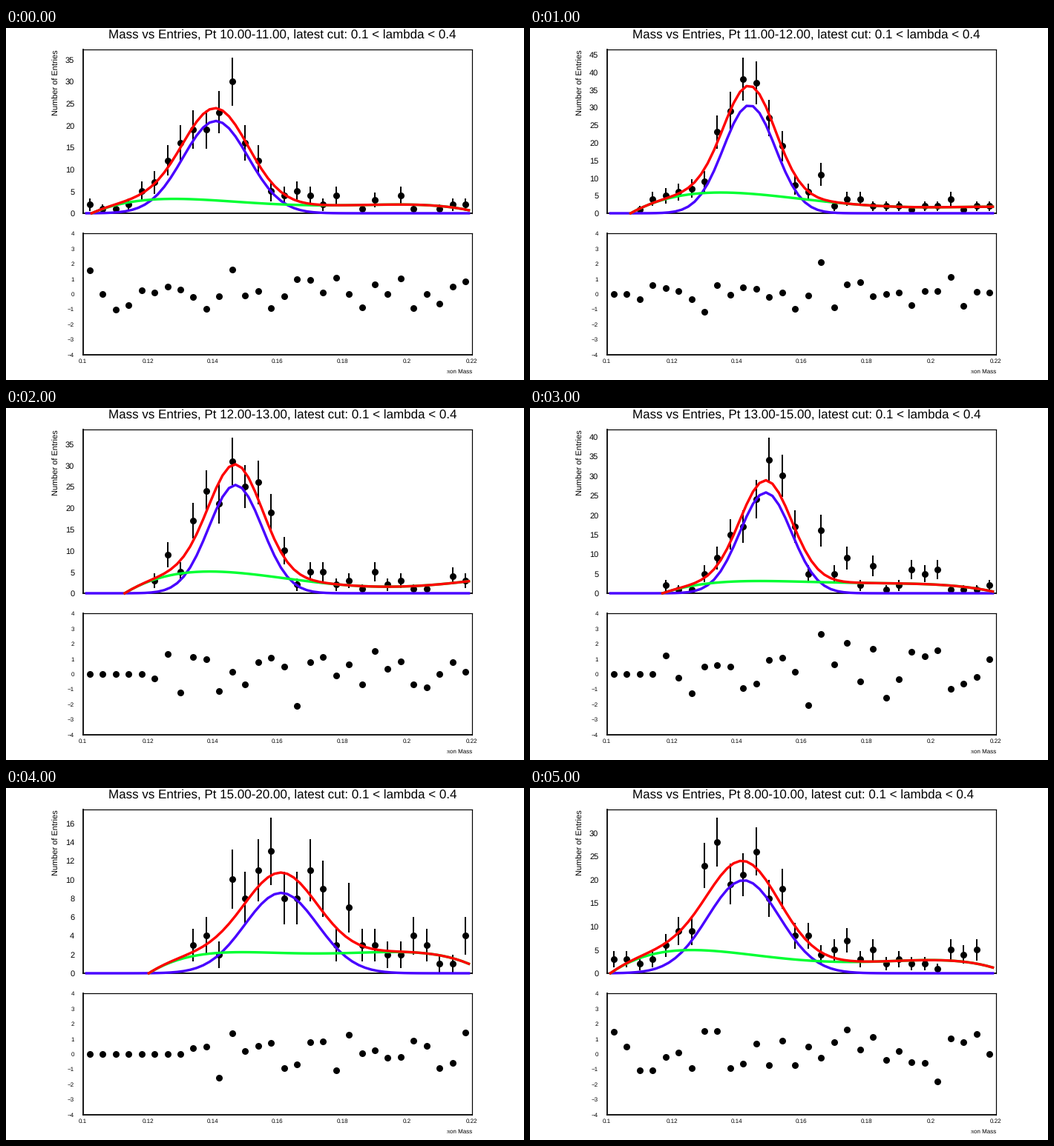
A matplotlib script for the animation above (6000 ms loop, 698 by 475 pixels).

```python
import numpy as np
import matplotlib.pyplot as plt
from matplotlib.animation import FuncAnimation

W, H, DPI = 698, 475, 100
PX = 72 / DPI  # points per pixel
LEFT, RIGHT = 104, 628

plt.rcParams["font.family"] = "Liberation Sans"
plt.rcParams["text.hinting"] = "none"
plt.rcParams["text.hinting_factor"] = 1

BINS = 0.102 + 0.004 * np.arange(30)
XS = 0.101 + 0.002 * np.arange(60)

fits = []


def gauss(x, height, mean, sigma):
    return height * np.exp(-0.5 * ((x - mean) / sigma) ** 2)


def add_fit(pt, peak, start, knots, counts):
    """Store one Pt range: Gaussian peak, quartic background, bin counts.

    The background is zero at `start`; `knots` are its values every 0.012
    up to 0.218.
    """
    kx = 0.218 - 0.012 * np.arange(len(knots))[::-1]
    weights = np.ones(len(knots) + 1)
    weights[[0, -1]] = 2
    mid = 0.16
    poly = np.polyfit(np.r_[start, kx] - mid, np.r_[0, knots], 4, w=weights)

    def back(x):
        return np.polyval(poly, x - mid)

    n = np.array(counts, float)
    err = np.sqrt(n)
    model = gauss(BINS, *peak) + back(BINS)
    pull = np.where(n > 0, (n - model) / np.maximum(err, 1), 0)
    bell = gauss(XS, *peak)
    fits.append(dict(
        title=f"Mass vs Entries, Pt {pt}, latest cut: 0.1 < lambda < 0.4",
        n=n, err=err, pull=pull, top=1.05 * (n + err).max(),
        curves=[bell, back(XS), bell + back(XS)]))


add_fit("10.00-11.00", (21.0, 0.1409, 0.01005), 0.1026,
        [1.83, 3.12, 3.15, 2.75, 2.2, 1.75, 1.78, 1.98, 1.92, 0.83],
        [2, 1, 1, 2, 5, 7, 12, 16, 19, 19, 23, 30, 16, 12, 5,
         4, 5, 4, 2, 4, 0, 1, 3, 0, 4, 1, 0, 1, 2, 2])
add_fit("11.00-12.00", (30.6, 0.1439, 0.0080), 0.1072,
        [1.29, 4.82, 5.95, 5.35, 4.25, 3.07, 2.2, 1.75, 1.72, 1.85],
        [0, 0, 1, 4, 5, 6, 7, 9, 23, 29, 38, 37, 27, 19, 8,
         6, 11, 2, 4, 4, 2, 2, 2, 1, 2, 2, 4, 1, 2, 2])
add_fit("12.00-13.00", (25.4, 0.1470, 0.00826), 0.1128,
        [3.24, 4.95, 4.95, 3.85, 2.75, 1.92, 1.54, 1.83, 2.74],
        [0, 0, 0, 0, 0, 3, 9, 5, 17, 24, 21, 31, 25, 26, 19,
         10, 2, 5, 5, 2, 3, 1, 5, 2, 3, 1, 1, 0, 4, 3])
add_fit("13.00-15.00", (25.75, 0.1489, 0.00796), 0.1171,
        [1.16, 2.75, 3.1, 3.02, 2.76, 2.6, 2.43, 1.97, 0.62],
        [0, 0, 0, 0, 2, 1, 1, 5, 9, 15, 17, 24, 34, 30, 17,
         5, 16, 5, 9, 2, 7, 1, 2, 6, 5, 6, 1, 1, 1, 2])
add_fit("15.00-20.00", (8.56, 0.1611, 0.0112), 0.1203,
        [0.4, 1.84, 2.23, 2.17, 2.13, 2.16, 2.27, 2.09, 1.15],
        [0, 0, 0, 0, 0, 0, 0, 0, 3, 4, 2, 10, 8, 11, 13,
         8, 8, 11, 9, 3, 7, 3, 3, 2, 2, 4, 3, 1, 1, 4])
add_fit("8.00-10.00", (19.85, 0.1421, 0.01107), 0.101,
        [3.28, 4.85, 4.68, 3.8, 3.03, 2.43, 2.43, 2.75, 2.72, 1.42],
        [3, 3, 2, 3, 6, 9, 9, 23, 28, 19, 21, 26, 16, 18, 8,
         8, 4, 5, 7, 3, 5, 2, 3, 2, 2, 1, 5, 4, 5, 0])

fig = plt.figure(figsize=(W / DPI, H / DPI), dpi=DPI, facecolor="white")


def panel(top, bottom):
    ax = fig.add_axes([LEFT / W, 1 - bottom / H,
                       (RIGHT - LEFT) / W, (bottom - top) / H])
    ax.set_xlim(0.1, 0.22)
    ax.set_xticks([])
    ax.set_yticks([])
    for side, spine in ax.spines.items():
        spine.set_linewidth((1.8 if side in ("left", "bottom") else 1.2) * PX)
    return ax


def label(x, y, text, size, **kw):
    """Text with its baseline at pixel (x, y) from the top left."""
    return fig.text(x / W, 1 - y / H, text, fontsize=size * PX,
                    va="baseline", **kw)


def dots(ax):
    return ax.plot([], [], "o", color="black", ms=9 * PX, mew=0, zorder=3,
                   clip_on=False)[0]


def above_zero(y):
    """Cut the start of a curve where it first rises above zero."""
    k = int(np.argmax(y >= 0))
    if k == 0:
        return XS, y
    cross = np.interp(0, y[k - 1:k + 1], XS[k - 1:k + 1])
    return np.r_[cross, XS[k:]], np.r_[0, y[k:]]


main = panel(29, 250)
resid = panel(277, 441)
resid.set_ylim(-4, 4)

points = dots(main)
pulls = dots(resid)
bars = main.vlines([], [], [], color="black", lw=2 * PX, zorder=3)
lines = [main.plot([], [], color=c, lw=3.4 * PX, zorder=4 + i, clip_on=False,
                   solid_joinstyle="round")[0]
         for i, c in enumerate(["#4800ff", "#00ff33", "#ff0000"])]

title = label(137.8, 14.2, "", 17)
label(71.3, 117.8, "Number of Entries", 11, rotation=90,
      rotation_mode="anchor", ha="left")
for v in range(-4, 5):
    label(92.2, 362 - 20.45 * v, str(v).replace("-", "\u2212"), 8, ha="right")
for i in range(7):
    label(LEFT - 0.3 + i * (RIGHT - LEFT) / 6, 452.3, f"{0.1 + 0.02 * i:.3g}",
          8, ha="center")
label(594, 466, "\u03c0", 8, family="Liberation Serif")
label(628.5, 466, "on Mass", 8, ha="right")

ticks = []


def update(i):
    fit = fits[i]
    title.set_text(fit["title"])
    main.set_ylim(0, fit["top"])

    for t in ticks:
        t.remove()
    ticks.clear()
    step = 5 if fit["top"] > 20 else 2
    for v in range(0, int(fit["top"]) + 1, step):
        y = 250 - 221 * v / fit["top"]
        ticks.append(label(92.3, y + 4.2, str(v), 11, ha="right"))

    hit = fit["n"] > 0
    x, n, err = BINS[hit], fit["n"][hit], fit["err"][hit]
    points.set_data(x, n)
    bars.set_segments([[(a, b - e), (a, b + e)] for a, b, e in zip(x, n, err)])
    pulls.set_data(BINS, fit["pull"])
    for line, y in zip(lines, fit["curves"]):
        line.set_data(*above_zero(y))
    return []


anim = FuncAnimation(fig, update, frames=len(fits), interval=1000,
                     repeat=True, cache_frame_data=False)
plt.show()
```
